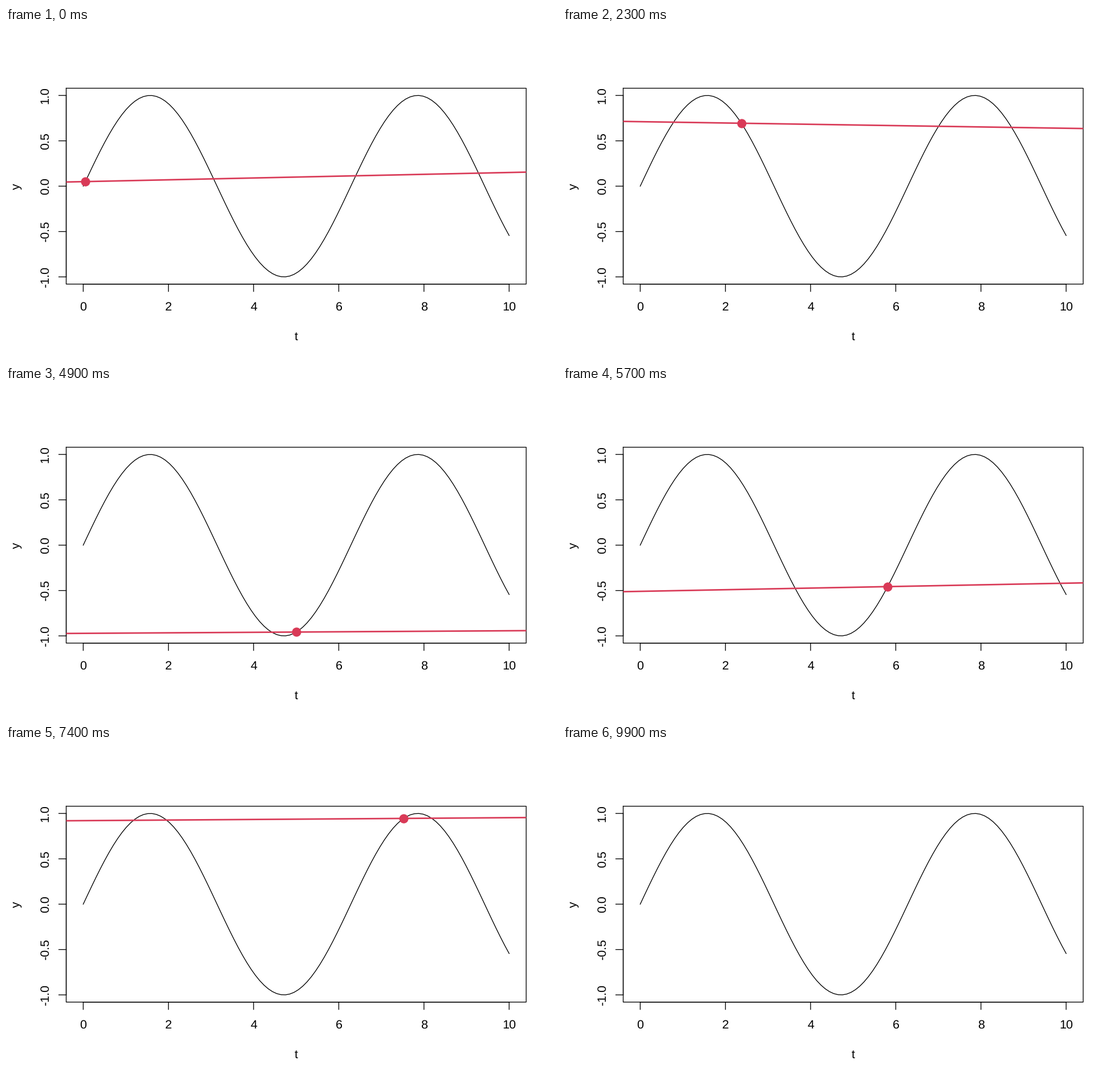
Write a matplotlib script that moves like this. It is 966 px wide and 580 px high and loops after 10 s.

```python
import numpy as np
import matplotlib.pyplot as plt
from matplotlib.animation import FuncAnimation

W, H, DPI = 966, 580, 100
PT = 72 / DPI                 # points per pixel
INCH = W / 7.506              # plot inch in pixels
ROW = 0.2 * INCH              # height of one margin line
THIN = INCH / 96
RED = "#d93a57"

plt.rcParams.update({
    "font.family": "Liberation Sans",
    "font.size": INCH / 6 * PT,
    "path.snap": False,
    "text.hinting": "none",
})

N = 100
t = np.linspace(0, 10, N)
y = np.sin(t)

# Plot region in pixels, measured from the top left
left, right = 4.1 * ROW, W - 2.1 * ROW
top, bottom = 4.1 * ROW, H - 5.1 * ROW


def padded(v):
    pad = 0.04 * (v.max() - v.min())
    return v.min() - pad, v.max() + pad


x0, x1 = padded(t)
y0, y1 = padded(y)


def px(v):
    return left + (v - x0) / (x1 - x0) * (right - left)


def py(v):
    return bottom - (v - y0) / (y1 - y0) * (bottom - top)


fig = plt.figure(figsize=(W / DPI, H / DPI), dpi=DPI, facecolor="white")
ax = fig.add_axes([0, 0, 1, 1])
ax.set(xlim=(0, W), ylim=(H, 0))
ax.axis("off")


def stroke(xs, ys, color="black", width=THIN, **kw):
    return ax.plot(xs, ys, color=color, lw=width * PT, **kw)[0]


def label(x, base, s, angle=0):
    ax.text(x, base, s, ha="center", va="baseline",
            rotation=angle, rotation_mode="anchor")


def draw_axes():
    tick = 0.5 * ROW
    stroke([left, right, right, left, left],
           [top, top, bottom, bottom, top], solid_joinstyle="round")
    stroke([px(0), px(10)], [bottom, bottom])
    stroke([left, left], [py(-1), py(1)])
    for v in range(0, 11, 2):
        stroke([px(v)] * 2, [bottom, bottom + tick])
        label(px(v), bottom + 1.8 * ROW, str(v))
    for v in np.linspace(-1, 1, 5):
        stroke([left, left - tick], [py(v)] * 2)
        label(left - 1.2 * ROW, py(v), f"{v:.1f}", 90)
    label((left + right) / 2, bottom + 3.8 * ROW, "t")
    label(left - 3.2 * ROW, (top + bottom) / 2, "y", 90)


draw_axes()
stroke(px(t), py(y), solid_joinstyle="round")

slope_line = stroke([], [], RED, 2 * THIN, zorder=3, solid_capstyle="butt")
dot = stroke([], [], RED, 0, zorder=4, marker="o", ms=INCH / 8 * PT, mew=0)


def update(i):
    if i == N - 1:            # no segment follows the last sample
        slope_line.set_data([], [])
        dot.set_data([], [])
        return slope_line, dot
    tm, ym = (t[i] + t[i + 1]) / 2, (y[i] + y[i + 1]) / 2
    slope = 0.1 * (y[i + 1] - y[i])
    ends = np.array([x0, x1])
    slope_line.set_data(px(ends), py(ym + slope * (ends - tm)))
    dot.set_data([px(tm)], [py(ym)])
    return slope_line, dot


anim = FuncAnimation(fig, update, frames=N, interval=100,
                     repeat=True, repeat_delay=0, blit=False)
plt.show()
```
